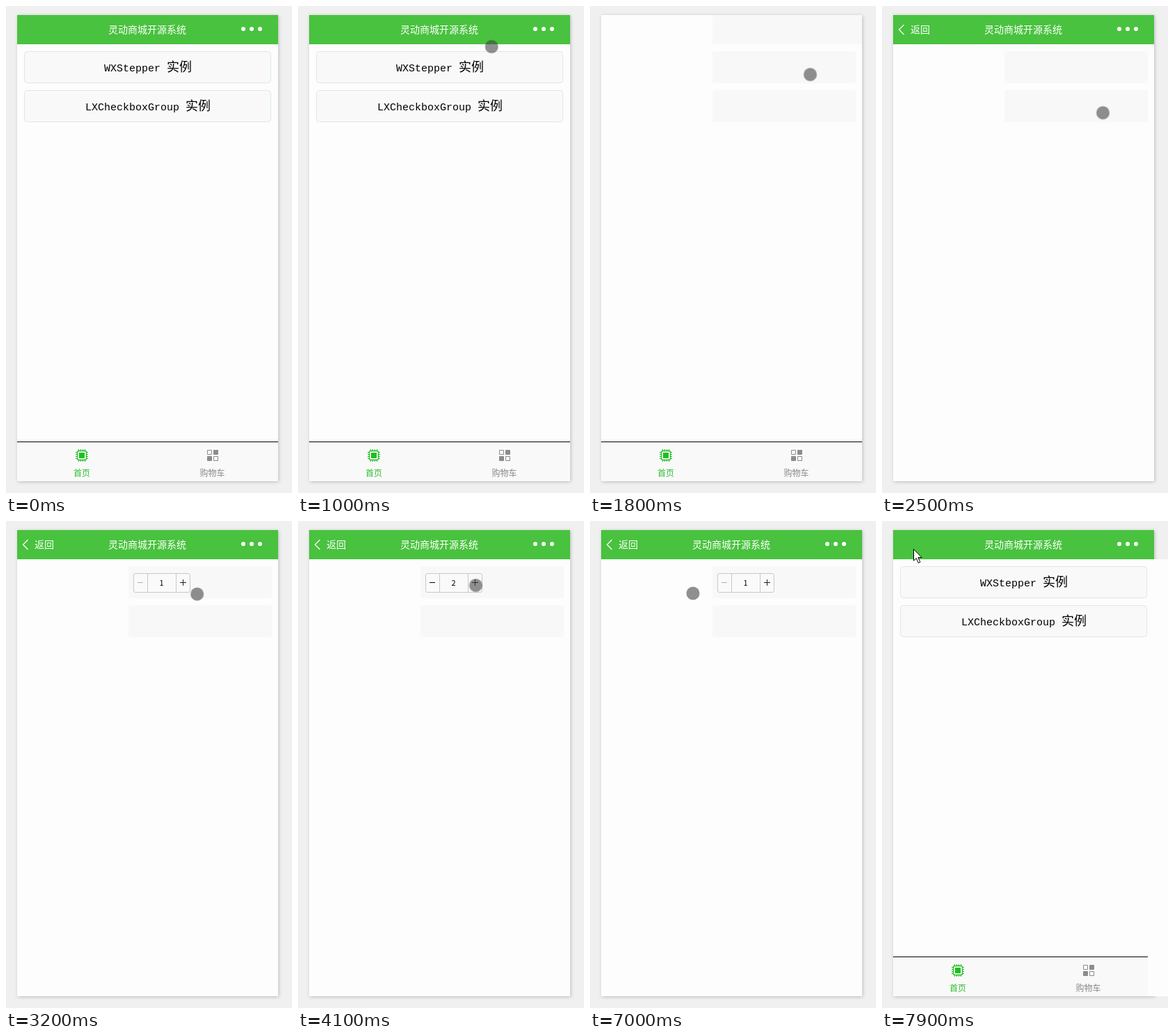
Write an HTML page that moves like this. It is 411 by 700 pixels and loops after 8000 ms.

```html
<!DOCTYPE html>
<html lang="zh-CN">
<head>
<meta charset="utf-8">
<title>灵动商城开源系统</title>
<style>
html, body { margin: 0; width: 100%; height: 100%; overflow: hidden; background: #f0f0f0; }
svg { display: block; }
text { font-family: "Noto Sans CJK SC", "Noto Sans CJK", sans-serif; }
.label { font: 15px "Liberation Mono", monospace; }
.label tspan { font: 300 18px "Noto Sans CJK SC", "Noto Sans CJK", sans-serif; }
.digit { font: 11px "Liberation Mono", monospace; text-anchor: middle; }
.bar text { font-size: 14px; fill: #fff; }
.tabs text { font-size: 12px; text-anchor: middle; }
.button { fill: #f9f9f9; stroke: #dfe8e2; }
.ghost { fill: #f8f8f8; }
.paper { fill: #fdfdfd; }

/* One 8 s clock for everything: 1.25% is 100 ms */
.anim { animation: 8s step-end -10ms infinite; }
.press { animation-name: press; }
.slide { animation-name: slide; }
.lid { animation-name: lid; }
.veil { animation-name: veil; }
.detail { animation-name: detail; }
.back { animation-name: back; }
.stepper { animation-name: stepper; }
.minus { animation-name: minus; }
.count { animation-name: count; }
.arrow { animation-name: arrow; }
.touch { animation-name: touch, path; animation-timing-function: step-end, linear; }

@keyframes press {
  0%, 100% { fill: #f9f9f9; stroke: #dfe8e2; }
  18.75% { fill: #e5e5e5; stroke: #d2d2d2; }
  26.25% { fill: #f9f9f9; stroke: #e5e5e5; }
}
@keyframes slide {
  0% { opacity: 0; transform: translateX(375px); }
  18.75% { opacity: 1; transform: translateX(375px); }
  20% { opacity: 1; transform: translateX(290px); }
  21.25% { opacity: 1; transform: translateX(160px); }
  22.5% { opacity: 1; transform: none; }
  26.25%, 100% { opacity: 0; transform: none; }
}
@keyframes lid { 0% { opacity: 0; } 20%, 100% { opacity: 1; } }
@keyframes veil { 0% { opacity: 0; } 22.5%, 100% { opacity: 1; } }
@keyframes detail {
  0% { opacity: 0; transform: none; }
  26.25% { opacity: 1; transform: none; }
  97.5% { opacity: 1; transform: translateX(170px); }
  98.75%, 100% { opacity: 1; transform: translateX(366px); }
}
@keyframes back { 0% { opacity: 0; } 26.25% { opacity: 1; } 97.5%, 100% { opacity: 0; } }
@keyframes stepper { 0% { opacity: 0; } 37.5%, 100% { opacity: 1; } }
@keyframes minus { 0% { opacity: .3; } 51.25% { opacity: 1; } 81.25%, 100% { opacity: .3; } }
@keyframes count {
  0% { transform: none; }
  51.25% { transform: translateY(-20px); }
  55% { transform: translateY(-40px); }
  57.5% { transform: translateY(-60px); }
  73.75% { transform: translateY(-40px); }
  77.5% { transform: translateY(-20px); }
  81.25%, 100% { transform: none; }
}
@keyframes arrow { 0% { opacity: 0; } 95%, 100% { opacity: 1; } }
@keyframes touch { 0% { opacity: 0; } 6.25% { opacity: 1; } 95%, 100% { opacity: 0; } }
@keyframes path {
  0%, 6.25% { transform: translate(389px, 50px); }
  8.75% { transform: translate(300px, 44px); }
  11.25% { transform: translate(236px, 50px); }
  12.5% { transform: translate(276px, 56px); }
  15%, 26.25% { transform: translate(316.5px, 98.5px); }
  30%, 32.5% { transform: translate(317.5px, 153.5px); }
  36.25% { transform: translate(290px, 142px); }
  38.75% { transform: translate(275px, 128px); }
  42.5% { transform: translate(274px, 66px); }
  46.25%, 47.5% { transform: translate(260px, 92px); }
  48.75%, 57.5% { transform: translate(255.5px, 92.5px); }
  60%, 62.5% { transform: translate(203px, 94px); }
  70%, 85% { transform: translate(191.5px, 97.5px); }
  86.25% { transform: translate(186px, 125px); }
  91.25%, 100% { transform: translate(49px, 49px); }
}
</style>
</head>
<body>
<svg width="411" height="700" viewBox="0 0 411 700">
  <defs>
    <filter id="shade" x="-10%" y="-10%" width="120%" height="120%">
      <feDropShadow dx="1" dy="1" stdDeviation="2.5" flood-opacity=".22"/>
    </filter>
    <g id="panels" class="ghost">
      <rect x="176" y="65" width="206" height="46" rx="3"/>
      <rect x="176" y="121" width="206" height="46" rx="3"/>
    </g>
  </defs>

  <rect width="411" height="700" fill="#f0f0f0"/>
  <rect class="paper" x="16" y="13" width="375" height="670" filter="url(#shade)"/>

  <!-- Home -->
  <rect class="button anim press" x="26.5" y="65.5" width="354" height="45" rx="4"/>
  <rect class="button" x="26.5" y="121.5" width="354" height="45" rx="4"/>
  <text class="label" x="141" y="94">WXStepper <tspan x="231">实例</tspan></text>
  <text class="label" x="114" y="150">LXCheckboxGroup <tspan x="258">实例</tspan></text>

  <g class="tabs">
    <rect x="16" y="626" width="375" height="57" fill="#f9f9fa"/>
    <rect x="16" y="626" width="375" height="1"/>
    <g fill="none" stroke="#1fbf1f">
      <path d="M104.500 637v18m3-18v18m3-18v18m3-18v18M100 641.500h18m-18 3h18m-18 3h18m-18 3h18"/>
      <rect x="102.500" y="639.500" width="13" height="13" rx="2" fill="#f9f9fa" stroke-width="1.300"/>
      <rect x="105.500" y="642.500" width="7" height="7" fill="#1fbf1f"/>
    </g>
    <g fill="none" stroke="#8c8c8c">
      <path d="M289.500 638.500h6v6h-6zM298.500 647.500h6v6h-6z"/>
      <path d="M298.500 638.500h6v6h-6zM289.500 647.500h6v6h-6z" fill="#8c8c8c"/>
    </g>
    <text x="109" y="676" fill="#2fc12f">首页</text>
    <text x="296.500" y="676" fill="#888">购物车</text>
  </g>

  <!-- Stepper page -->
  <g class="anim detail">
    <rect class="paper" x="16" y="55" width="375" height="628"/>
    <use href="#panels"/>
    <g class="anim stepper">
      <rect x="183.500" y="75.500" width="81" height="27" rx="2.500" fill="#fafafa" stroke="#c8c8c8"/>
      <path d="M203.500 76v26M244.500 76v26" stroke="#c8c8c8"/>
      <path class="anim minus" d="M189 88.500h8" stroke="#000"/>
      <path d="M250 88.500h9M254.500 84v9" stroke="#222"/>
      <svg x="205" y="79" width="38" height="20">
        <g class="anim count digit">
          <text x="18.500" y="14">1</text>
          <text x="18.500" y="34">2</text>
          <text x="18.500" y="54">3</text>
          <text x="18.500" y="74">4</text>
        </g>
      </svg>
    </g>
  </g>

  <g class="bar">
    <rect x="16" y="13" width="375" height="42" fill="#49c23f"/>
    <text x="147" y="39">灵动商城开源系统</text>
    <g fill="#fff">
      <circle cx="341" cy="33" r="3"/>
      <circle cx="353" cy="33" r="3"/>
      <circle cx="365" cy="33" r="3"/>
    </g>
    <g class="anim back">
      <path d="M31.500 27l-7 7 7 7" fill="none" stroke="#fff" stroke-width="1.200"/>
      <text x="41" y="39">返回</text>
    </g>
  </g>

  <!-- Incoming blank page -->
  <g class="anim slide">
    <rect class="paper" x="16" y="55" width="375" height="571"/>
    <rect class="paper anim lid" x="16" y="13" width="375" height="42"/>
    <g class="anim veil">
      <rect class="ghost" x="176" y="13" width="215" height="42"/>
      <use href="#panels"/>
    </g>
  </g>

  <circle class="anim touch" r="9.500" fill="#3c3c3c" fill-opacity=".57"/>
  <path class="anim arrow" d="M45.500 40.500v16.500l3.800-3.500 3 6.800 2.600-1.200-3-6.600h5.200z" fill="#fff" stroke="#000"/>
</svg>
</body>
</html>
```
